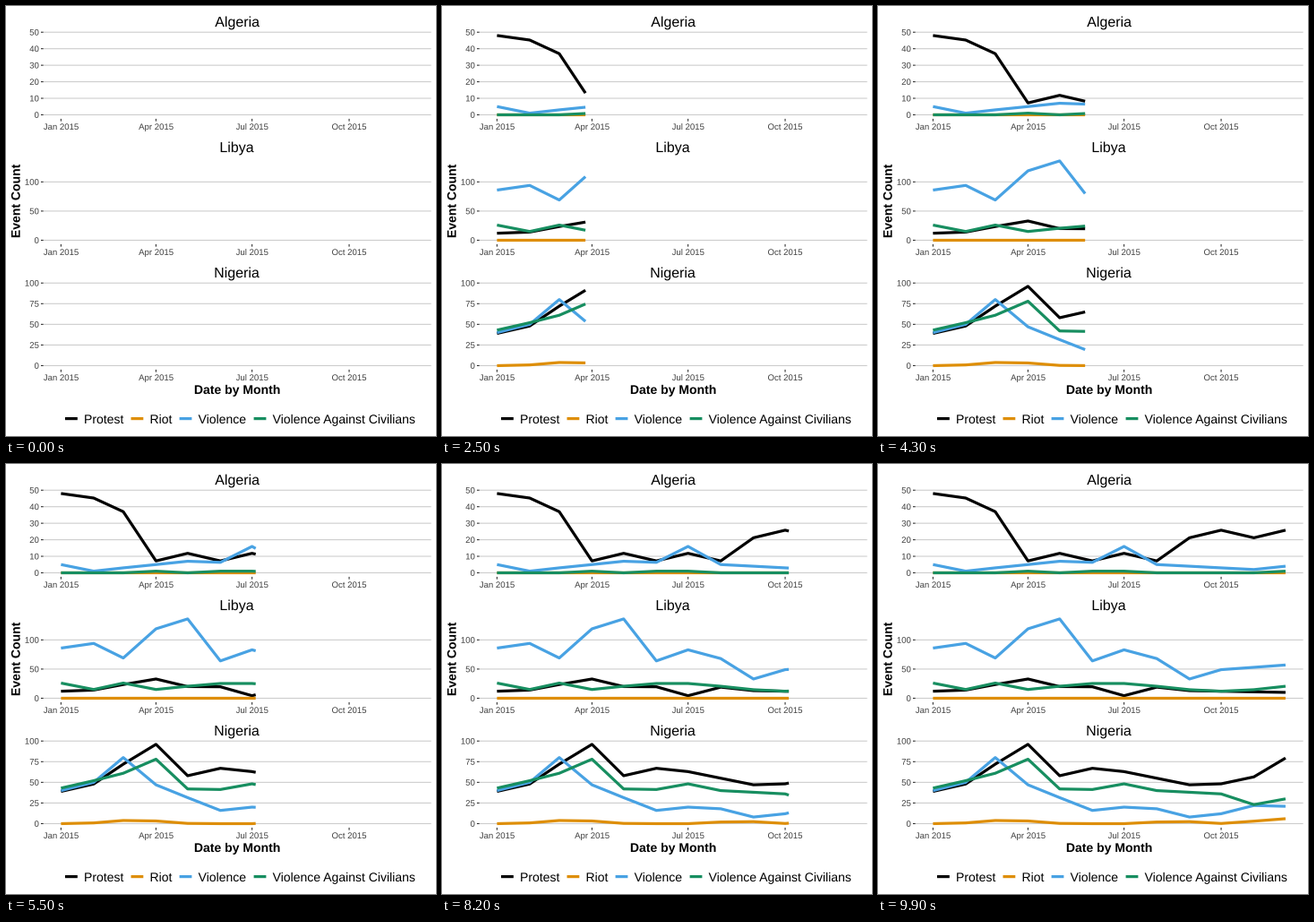
These frames come from a looping animation (480x480 px, 10000 ms). A matplotlib script:

```python
import matplotlib.pyplot as plt
import numpy as np
from matplotlib.animation import FuncAnimation
from matplotlib.patches import PathPatch
from matplotlib.textpath import TextPath
from matplotlib.transforms import Affine2D

SIZE, FRAMES = 480, 100
LEFT, RIGHT = 41.7, 474.6
HEIGHT, BOTTOM, PITCH = 97.4, 125.9, 140
MIDDLE = (LEFT + RIGHT) / 2
THIN, THICK = 1.07, 3.2
GRID, TICK, GREY = "#CCCCCC", "#2B2B2B", "#404040"

# One typographic point equals one pixel at this dpi
fig = plt.figure(figsize=(SIZE / 72, SIZE / 72), dpi=72, facecolor="white")
ax = fig.add_axes([0, 0, 1, 1])
ax.set(xlim=(0, SIZE), ylim=(SIZE, 0))
ax.axis("off")

# Day of the year on which each month starts
months = np.arange("2015-01", "2016-01", dtype="datetime64[M]")
days = (months.astype("datetime64[D]") - np.datetime64("2015-01-01")).astype(int)
pad = (RIGHT - LEFT) / 22
xs = LEFT + pad + days / days[-1] * (RIGHT - LEFT - 2 * pad)
# Each month is reached on a whole frame
keys = np.round((FRAMES - 1) * days / days[-1])

m = np.arange(12)
flip = (-1.0) ** m


def path(*points):
    """Straight runs between (month, value) turning points."""
    return np.interp(m, *zip(*points))


def peak(at, height, width=1):
    return height * np.maximum(0, 1 - abs(m - at) / width)


def after(month):
    return np.maximum(0, m - month)


QUIET = 0.0 * m

# Protest, riot, violence, violence against civilians
PANELS = {
    "Algeria": (10, [
        np.select([m < 3, m < 8], [48 - 2.75 * m**2, 9.5 + 2.3 * flip],
                  23.5 - 2.3 * flip),
        QUIET,
        path((0, 5), (1, 1), (4, 7), (7, 5), (10, 2), (11, 4)) + peak(6, 10.3),
        1.0 * np.isin(m, (3, 5, 6, 11)),
    ]),
    "Libya": (50, [
        path((0, 12), (1, 14), (3, 33), (4, 20), (7, 19), (8, 13), (11, 10))
        + peak(6, -15),
        QUIET,
        path((0, 86), (1, 94), (2, 69), (3, 119), (4, 136), (5, 64), (6, 83),
             (7, 68), (8, 33), (9, 49), (11, 57)),
        np.where(m < 4, 20.5 + 5.5 * flip,
                 19 + 7 * np.cos(2 * np.pi * (m - 5.5) / 7)),
    ]),
    "Nigeria": (25, [
        path((0, 39), (1, 48), (3, 96), (4, 58), (5, 67), (6, 63), (8, 47))
        + 1.2 * after(8) ** 3,
        peak(2.4, 5, 1.7) + peak(7.6, 3.3, 1.5) + 3 * after(9),
        path((0, 40), (1, 50), (2, 80), (3, 47), (5, 16), (6, 20), (7, 18),
             (8, 8), (9, 12), (10, 22), (11, 21)),
        path((0, 43), (2, 61), (3, 78), (4, 42), (7, 40), (9, 36), (10, 23),
             (11, 30)) + peak(6, 7.5),
    ]),
}
KINDS = {
    "Protest": "#000000",
    "Riot": "#DE8E06",
    "Violence": "#48A2E3",
    "Violence Against Civilians": "#178E60",
}


def segment(x0, y0, x1, y1, color, width=THIN):
    ax.plot([x0, x1], [y0, y1], color=color, lw=width,
            solid_capstyle="butt", snap=False)


def label(x, y, s, size, color="black", align=0.5, weight="normal", angle=0):
    """Outline text on baseline y; align 0 is left, 0.5 centre, 1 right."""
    shape = TextPath((0, 0), s, size=size,
                     prop={"family": "Liberation Sans", "weight": weight})
    box = shape.get_extents()
    shift = -align * (box.x0 + box.x1) if align < 1 else -box.x1
    place = (Affine2D().translate(shift, 0).rotate_deg(angle)
             .scale(1, -1).translate(x, y))
    ax.add_patch(PathPatch(shape, facecolor=color, lw=0,
                           transform=place + ax.transData))


def draw_panel(name, bottom):
    """Draw the static parts of a panel and return its animated lines."""
    step, series = PANELS[name]
    zero = bottom - HEIGHT / 22
    top = np.max(series)
    scale = HEIGHT / 1.1 / top
    label(MIDDLE, bottom - 102.8, name, 16)
    for v in range(0, int(top * 1.05) + 1, step):
        y = zero - v * scale
        segment(LEFT, y, RIGHT, y, GRID)
        segment(LEFT - 2.75, y, LEFT, y, TICK)
        label(36.5, y + 3.4, str(v), 9.6, GREY, align=1)
    for i in range(0, 12, 3):
        segment(xs[i], bottom, xs[i], bottom + 2.75, TICK)
        label(xs[i], bottom + 12.1, f"{months[i].item():%b %Y}", 9.6, GREY)
    curves = []
    for values, color in zip(series, KINDS.values()):
        line, = ax.plot([], [], color=color, lw=THICK, solid_capstyle="butt",
                        solid_joinstyle="round", snap=False, zorder=3)
        curves.append((line, zero - values * scale))
    return curves


curves = []
for row, name in enumerate(PANELS):
    curves += draw_panel(name, BOTTOM + PITCH * row)

label(MIDDLE, 433, "Date by Month", 14, weight="bold")
label(15.6, 217.5, "Event Count", 14, weight="bold", angle=90)

for x, (kind, color) in zip((66, 139.5, 193.6, 276.6), KINDS.items()):
    segment(x, 460.6, x + 13.8, 460.6, color, THICK)
    label(x + 21, 466, kind, 14, align=0)


def update(frame):
    done = keys < frame
    head = np.interp(frame, keys, xs)
    for line, ys in curves:
        if frame == 0:
            line.set_data([], [])
        else:
            line.set_data(np.append(xs[done], head),
                          np.append(ys[done], np.interp(frame, keys, ys)))
    return [line for line, _ in curves]


anim = FuncAnimation(fig, update, frames=FRAMES, interval=100,
                     repeat=True, repeat_delay=0, blit=False)
plt.show()
```
